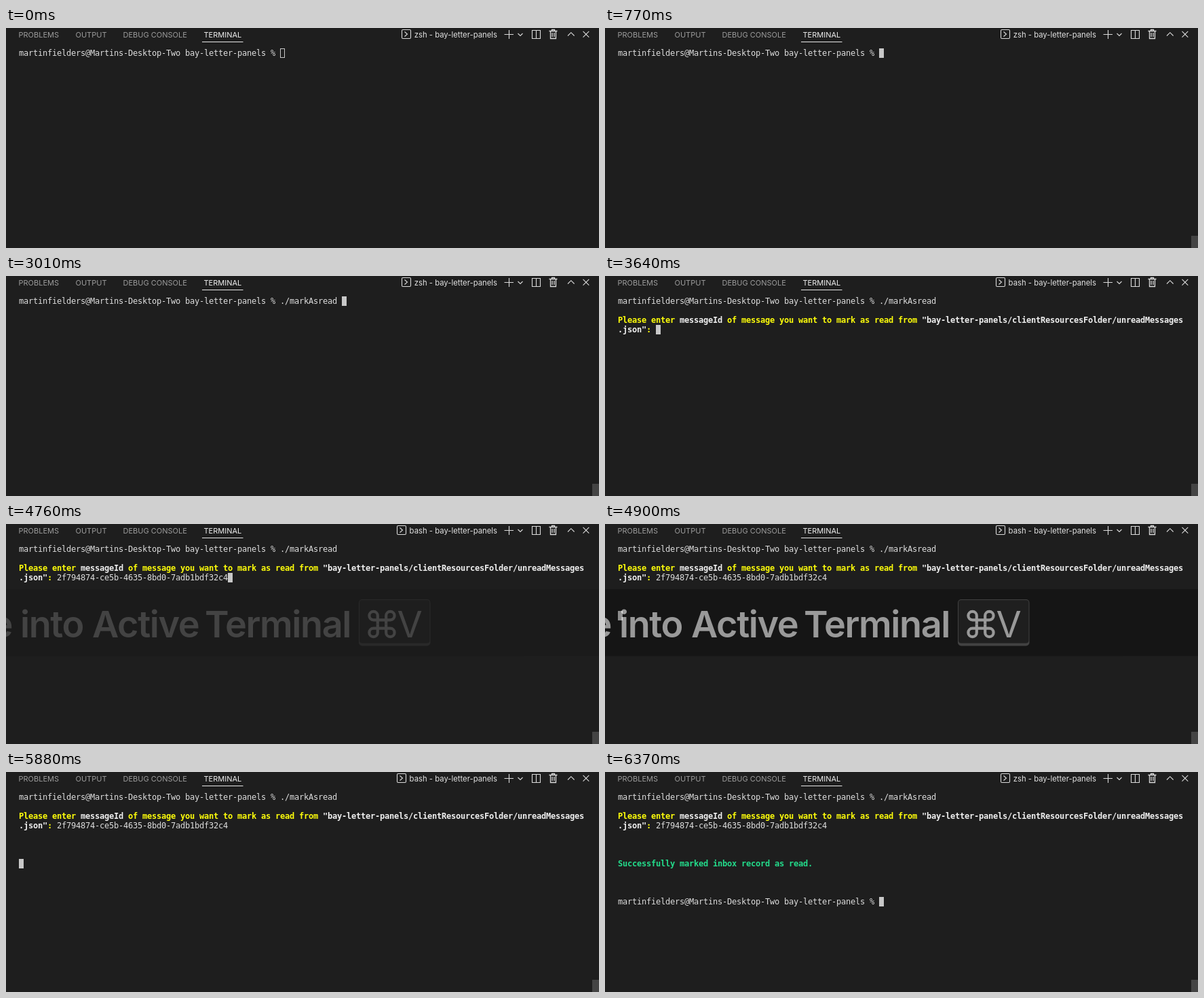
An HTML page that plays this animation: 874x324 px, repeating every 7560 ms.

```html
<!DOCTYPE html>
<html lang="en">
<head>
<meta charset="utf-8">
<title>Terminal session</title>
<style>
  html, body { margin: 0; width: 100%; height: 100%; overflow: hidden; background: #1e1e1e; }
  body { position: relative; }
  svg, pre, #cursor, #scrollbar { position: absolute; }
  svg { left: 0; top: 0; font-family: Inter, "Liberation Sans", sans-serif; font-optical-sizing: none; }
  pre {
    left: 19px; top: 30px; margin: 0; color: #dedede;
    font: 12px/14px "DejaVu Sans Mono", monospace;
    letter-spacing: calc(7px - 1ch);
  }
  pre b { color: #f0f0f0; }
  pre .ask { color: #ffff0a; }
  pre .done { color: #23dc8b; }
  #cursor { width: 7px; height: 14px; box-sizing: border-box; border: 1px solid #c8c8c8; }
  #scrollbar { left: 864px; top: 306px; width: 10px; height: 18px; background: #444; }
  .tabs { font-size: 11px; fill: #9c9c9c; }
  .icons { fill: none; stroke: #dadada; stroke-width: 1.1; }
  .big { font-size: 54px; font-weight: 600; letter-spacing: -1.4px; fill: #f0f0f0; }
</style>
</head>
<body>
<pre id="screen"></pre>
<div id="cursor"></div>
<div id="scrollbar"></div>
<svg width="874" height="324" viewBox="0 0 874 324">
  <g class="tabs">
    <text x="18.5" y="13.5">PROBLEMS</text>
    <text x="102.5" y="13.5">OUTPUT</text>
    <text x="172.5" y="13.5">DEBUG CONSOLE</text>
    <text x="291.5" y="13.5" fill="#f0f0f0">TERMINAL</text>
    <text id="title" x="724" y="13.5" fill="#e2e2e2" font-size="11.3" text-anchor="end"></text>
  </g>
  <path d="M289 20.5H349.5" stroke="#e7e7e7"/>
  <g class="icons">
    <g id="shell"><rect x=".5" y="2.5" width="13" height="13" rx="1.5"/><path d="M4.5 5.5L8.5 9L4.5 12.5"/></g>
    <path d="M734.5 9.5H748M741.5 3V16"/>
    <path d="M754.5 8L758 11.5L761.5 8"/>
    <path d="M775.5 3.5H787.5V15.5H775.5ZM781.5 3.5V15.5"/>
    <path d="M800.5 4.5H812.5M804.5 4.5V2.5H808.5V4.5M802.5 4.5V15.5H810.5V4.5M805 7V13M808 7V13" stroke-width="1.3"/>
    <path d="M828 11.5L832.8 6.7L837.6 11.5M850.5 4.8L859.3 13.6M859.3 4.8L850.5 13.6"/>
  </g>
  <g id="overlay">
    <rect y="96" width="874" height="98.5" fill="#000" fill-opacity=".5"/>
    <g class="big">
      <text x="9" y="167" text-anchor="end">Paste</text>
      <text x="21" y="167">into</text>
      <text x="127" y="167">Active</text>
      <text x="293" y="167">Terminal</text>
    </g>
    <rect x="520" y="111" width="105.5" height="68.5" rx="5" fill="#5c5c5c"/>
    <rect x="521" y="112" width="103.5" height="63.5" rx="4" fill="#202020"/>
    <g transform="translate(554 147.5)" fill="none" stroke="#f0f0f0" stroke-width="4.2">
      <path id="loop" d="M0-6.2H12.4A6.2 6.2 0 1 0 6.2-12.4V0"/>
      <use href="#loop" transform="rotate(90)"/>
      <use href="#loop" transform="rotate(180)"/>
      <use href="#loop" transform="rotate(270)"/>
    </g>
    <text x="576.5" y="167" font-size="54" font-weight="400" fill="#f0f0f0">V</text>
  </g>
</svg>
<script>
const LOOP = 7560, TICK = 70;
const folder = 'bay-letter-panels';
const prompt = `martinfielders@Martins-Desktop-Two ${folder} % `;
const command = './markAsread ';
const id = '2f794874-ce5b-4635-8bd0-7adb1bdf32c4';
const question = '<b class="ask">Please enter </b><b>messageId</b><b class="ask"> of message you want to mark as read from </b>' +
  `<b>"${folder}/clientResourcesFolder/unreadMessages\n.json"</b><b class="ask">: </b>`;
const success = '<b class="done">Successfully marked inbox record as read.</b>';

// [time, number of command characters visible]
const keys = [[1540, 1], [1820, 2], [2310, 3], [2520, 4], [2590, 5], [2800, 6], [3010, 13]];
const PRINT = 3570, PASTE = 4620, ENTER = 4900, HIDE = 5880, DONE = 6370;

const [screen, cursor, scrollbar, title, shell, overlay] =
  ['screen', 'cursor', 'scrollbar', 'title', 'shell', 'overlay'].map(n => document.getElementById(n));

function moveCursor(col, row) {
  cursor.style.left = 19 + 7 * col + 'px';
  cursor.style.top = 30 + 14 * row + 'px';
}

function render(t) {
  const typed = keys.reduce((n, [time, count]) => t >= time ? count : n, 0);
  let text = prompt + command.slice(0, typed);
  let pos = [prompt.length + typed, 0];
  if (t >= PRINT) {
    text += '\n\n' + question;
    pos = [8, 3];
  }
  if (t >= PASTE) {
    text += id;
    pos = [8 + id.length, 3];
  }
  if (t >= ENTER) pos = [0, 7];
  if (t >= DONE) {
    text += '\n\n\n\n' + success + '\n\n\n\n' + prompt;
    pos = [prompt.length, 11];
  }
  screen.innerHTML = text;
  moveCursor(...pos);
  cursor.style.background = t >= 700 ? '#c8c8c8' : 'none';
  scrollbar.style.display = t >= 280 ? 'block' : 'none';

  const bash = t >= 3640 && t < DONE;
  title.textContent = `${bash ? 'bash' : 'zsh'} - ${folder}`;
  shell.setAttribute('transform', `translate(${bash ? 576 : 583} 0)`);
  overlay.style.opacity = t >= HIDE ? 0 : Math.min(1, Math.max(0, (t - 4700) / 340));
}

let last = -1;
function frame(now) {
  const t = Math.floor(now % LOOP / TICK) * TICK;
  if (t !== last) render(last = t);
  requestAnimationFrame(frame);
}
frame(performance.now());
</script>
</body>
</html>
```
